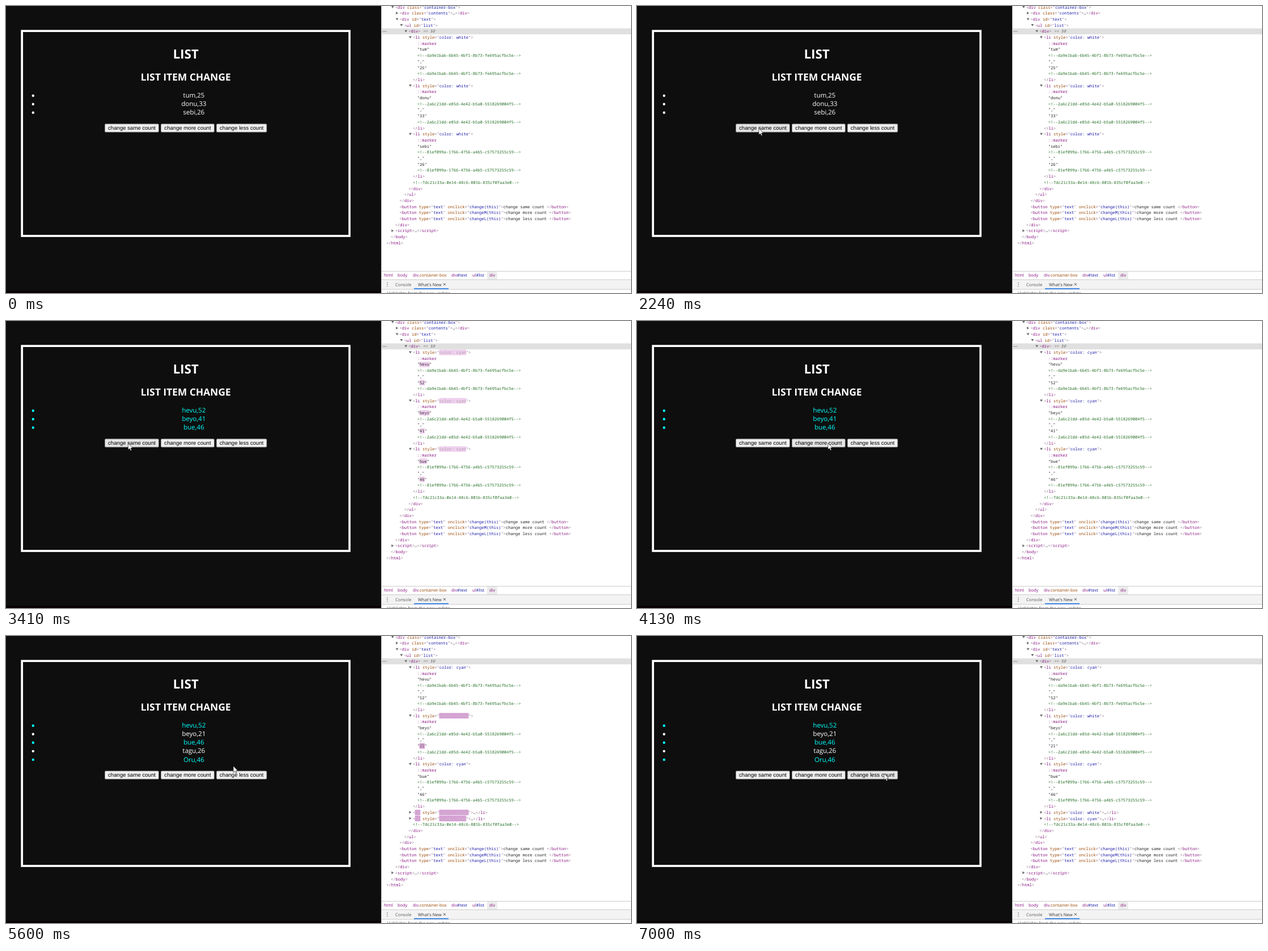
Animation of 1103x508 px, one loop 8 s. Source, as an HTML page:

```html
<!DOCTYPE html>
<html lang="en">
<head>
<meta charset="utf-8">
<style>
  html, body { margin: 0; width: 100%; height: 100%; overflow: hidden; background: #fff; }
  svg { display: block; }
  text { white-space: pre; text-rendering: geometricPrecision; }
  .page { font: 500 11.5px "Open Sans", "Noto Sans", sans-serif; text-anchor: middle; }
  .title { font: 700 22.3px "Open Sans", "Noto Sans", sans-serif; text-anchor: middle; fill: #fff; }
  .btn { font: 9.62px "Liberation Sans", Arial, sans-serif; text-anchor: middle; }
  .code { font: 500 7.1px "Noto Sans Mono", "DejaVu Sans Mono", monospace; }
  .ui { font: 7.4px "Open Sans", "Noto Sans", sans-serif; fill: #5a5a5a; }
  .bracket { fill: #8d6c8b; }
  .tag { fill: #881280; }
  .attr { fill: #994500; }
  .value { fill: #1a1aa6; }
  .comment { fill: #236e25; }
  .plain { fill: #222; }
  .ref { fill: #777; font-style: italic; }
</style>
</head>
<body>
<svg width="1103" height="508" viewBox="0 0 1103 508">
  <rect width="1103" height="508" fill="#fff"/>
  <rect width="662" height="508" fill="#0e0e0e"/>
  <rect y="504.5" width="662" height="3.5" fill="#080003"/>
  <rect x="662" width="1" height="508" fill="#c4c4c4"/>
  <rect x="28.2" y="44.2" width="578" height="362.8" fill="none" stroke="#fff" stroke-width="3.7"/>
  <text class="title" x="317.3" y="93">LIST</text>
  <text class="title" x="317.3" y="131.5" style="font-size:17.4px">LIST ITEM CHANGE</text>
  <g id="page"></g>
  <rect x="663" y="39.6" width="440" height="10.6" fill="#e0e0e0"/>
  <path d="M665 45h0m2.8 0h0m2.8 0h0" stroke="#555" stroke-width="1.4" stroke-linecap="round"/>
  <g id="tree" class="code"></g>
  <g class="ui">
    <path d="M663 469.5h440M663 484.5h440" stroke="#ccc"/>
    <rect x="849" y="470" width="18" height="14" fill="#ececec"/>
    <g class="tag">
      <text x="667" y="479.3">html</text>
      <text x="691" y="479.3">body</text>
      <text x="718" y="479.3">div<tspan class="attr">.container-box</tspan></text>
      <text x="786" y="479.3">div<tspan class="value">#text</tspan></text>
      <text x="823" y="479.3">ul<tspan class="value">#list</tspan></text>
      <text x="853" y="479.3">div</text>
    </g>
    <rect x="663" y="485" width="440" height="16" fill="#f3f3f3"/>
    <path d="M663 501.5h440" stroke="#ccc"/>
    <path d="M673 489.7h0m0 3.1h0m0 3.1h0" stroke="#555" stroke-width="1.5" stroke-linecap="round"/>
    <text x="687" y="495.6" style="font-size:7.6px">Console</text>
    <text x="727" y="495.6" style="font-size:7.6px" fill="#333">What's New</text>
    <path d="M771.8 490.6l4 4m0-4l-4 4" stroke="#333" stroke-width=".9"/>
    <rect x="720" y="499.6" width="61" height="1.6" fill="#1a73e8"/>
    <text x="672" y="511.3" style="font-size:7.6px">Highlights from the new update</text>
  </g>
  <path id="cursor" d="M0 0V11.5L2.6 9.2 4.4 13 6.2 12.2 4.5 8.4H8Z" fill="#fff" stroke="#000" stroke-width=".6"/>
</svg>
<script>
const LOOP = 8000, CHAR = 4.26, ROW = 10.7, FADE = 1400;
const $ = id => document.getElementById(id);

// Each list: when it appears, then [name, age, colour] per item
const lists = [
  { at: 0, items: [['tum', 25, 'white'], ['donu', 33, 'white'], ['sebi', 26, 'white']] },
  { at: 2664, items: [['hevu', 52, 'cyan'], ['beyo', 41, 'cyan'], ['bue', 46, 'cyan']] },
  { at: 5264, items: [['hevu', 52, 'cyan'], ['beyo', 21, 'white'], ['bue', 46, 'cyan'],
                      ['tagu', 26, 'white'], ['Oru', 46, 'cyan']] }
];
const ids = ['da9e1bab-6b45-4bf1-8b73-fe695acfbc5e',
             '2a6c21dd-e85d-4e42-b5a0-5518269004f5',
             '81ef099a-1766-4756-a4b5-c57573255c59'];
const buttons = [['same', 174.5, 95, ''], ['more', 273.5, 94, 'M'], ['less', 371.5, 88.5, 'L']];
const hovers = [[690, 3560], [3800, 5420], [6000, LOOP]];
const clicks = [2530, 5130];

const track = [
  [250, 505, 452], [410, 400, 330], [580, 255, 236], [740, 214, 216],
  [2239, 214, 216], [2240, 215, 216.5], [2530, 215.5, 216.5],
  [3450, 215.5, 216.5], [3700, 260, 222], [3950, 320, 219], [4130, 337, 216],
  [5400, 337, 216], [5600, 401, 230], [5760, 424, 236], [6000, 430, 240],
  [6400, 433, 247], [6710, 433, 249], [6860, 433, 249], [7000, 436, 243.5]
];

const mix = (a, b, p) => `rgb(${a.map((v, i) => Math.round(v + (b[i] - v) * p))})`;

// cubic-bezier(0, 0, .2, 1)
function ease(x) {
  let lo = 0, hi = 1;
  for (let i = 0; i < 20; i++) {
    const s = (lo + hi) / 2;
    if (.6 * s * s + .4 * s ** 3 < x) lo = s; else hi = s;
  }
  return 3 * lo * lo - 2 * lo ** 3;
}

// Colours of a changed part, or null once the highlight is over
function highlight(age) {
  const p = age / FADE;
  if (p >= 1) return null;
  const a = ease(Math.min(1, p / .8)), b = ease(Math.max(0, (p - .8) / .2));
  return {
    back: b ? mix([245, 219, 244], [255, 255, 255], b) : mix([158, 54, 153], [245, 219, 244], a),
    tag: mix([255, 255, 255], [168, 148, 166], a),
    text: mix([255, 255, 255], [34, 34, 34], a)
  };
}

// Rows are [depth, markup, arrow]; "~" marks a part that has just changed
function treeRows(step) {
  const { items } = lists[step], old = lists[Math.max(0, step - 1)].items;
  const rows = [[2, '<div class="container-box">', 'v'], [3, '<div class="contents">…</div>', '>'],
    [3, '<div id="text">', 'v'], [4, '<ul id="list">', 'v'], [5, '<div> == $0', 'v']];
  items.forEach((item, i) => {
    const was = old[i] || [];
    const [name, age, color] = item.map((v, k) => v === was[k] ? v : '~' + v);
    const style = `style="${color[0] === '~' ? '~' : ''}color: ${item[2]}"`;
    if (i > 2) return rows.push([6, `<~li ${style}>…</li>`, '>']);
    const note = [7, `<!--${ids[i]}-->`];
    rows.push([6, `<li ${style}>`, 'v'], [7, '::marker'], [7, `"${name}"`], note,
      [7, '","'], [7, `"${age}"`], note, [6, '</li>']);
  });
  rows.push([6, '<!--Tdc21c33a-0e14-48c6-801b-835cf0faa3e0-->'], [5, '</div>'], [4, '</ul>'], [3, '</div>']);
  for (const [word, , , letter] of buttons)
    rows.push([3, `<button type="text" onclick="change${letter}(this)">change ${word} count </button>`]);
  rows.push([2, '</div>'], [2, '<script>…<\/script>', '>'], [1, '</body>'], [0, '</html>']);
  return rows;
}

const pattern = /(<!--.*?-->)|(<\/?)(~?\w+)|(\w+)(=")(.*?)(")|(>)|(== \$0|::marker)|(\s|"|~?[^<>"~]+)/g;
const kinds = ['comment', 'bracket', 'tag', 'attr', 'bracket', 'value', 'bracket', 'bracket', 'ref', 'plain'];

function drawRow([depth, markup, arrow], index, glow) {
  const x = 671.2 + 7.8 * depth, y = 2 + ROW * index;
  let col = 0, back = '', spans = '';
  for (const match of markup.matchAll(pattern)) {
    match.slice(1).forEach((part, k) => {
      if (!part) return;
      const changed = part[0] === '~', word = changed ? part.slice(1) : part;
      const kind = word === '::marker' ? 'tag' : kinds[k];
      let style = '';
      if (changed && glow) {
        back += `<rect x="${x + col * CHAR - .5}" y="${y - 4.9}" width="${word.length * CHAR + 1}" height="9.8" rx="1" fill="${glow.back}"/>`;
        style = ` style="fill:${kind === 'plain' ? glow.text : glow.tag}"`;
      }
      spans += `<tspan class="${kind}"${style}>${word.replace(/</g, '&lt;')}</tspan>`;
      col += word.length;
    });
  }
  const mark = { v: `M${x - 7} ${y - 2}h5l-2.5 4z`, '>': `M${x - 6.5} ${y - 2.7}v5l4-2.5z` }[arrow];
  return back + (mark ? `<path d="${mark}" fill="#6e6e6e"/>` : '') +
    `<text x="${x}" y="${y + 2.5}">${spans}</text>`;
}

function drawPage(items, t) {
  const list = items.map(([name, age, color], i) => {
    const y = 158.3 + 15.05 * i;
    return `<g fill="${color}"><circle cx="47.8" cy="${y + .4}" r="2.2"/>` +
      `<text class="page" x="331.5" y="${y + 4}">${name},${age}</text></g>`;
  });
  const top = 208.8 + 15.05 * (items.length - 3);
  const row = buttons.map(([word, x, w], i) => {
    const over = t >= hovers[i][0] && t < hovers[i][1];
    const down = t >= clicks[i] && t < clicks[i] + 130;
    return `<rect x="${x}" y="${top}" width="${w}" height="14.4" rx="1.5" fill="${down ? '#f5f5f5' : over ? '#e5e5e5' : '#efefef'}" stroke="#767676" stroke-width=".8"/>` +
      `<text class="btn" x="${x + w / 2}" y="${top + 10.5}">change ${word} count</text>`;
  });
  return list.concat(row).join('');
}

function cursorAt(t) {
  const i = track.findIndex(k => k[0] > t);
  if (i < 0) return track[track.length - 1].slice(1);
  const [t0, x0, y0] = track[i - 1], [t1, x1, y1] = track[i];
  const p = (t - t0) / (t1 - t0);
  return [x0 + (x1 - x0) * p, y0 + (y1 - y0) * p];
}

const start = performance.now();
function frame() {
  const t = (performance.now() - start) % LOOP;
  const step = lists.filter(l => l.at <= t).length - 1, { at, items } = lists[step];
  const glow = step ? highlight(t - at) : null;
  $('page').innerHTML = drawPage(items, t);
  $('tree').innerHTML = treeRows(step).map((row, i) => drawRow(row, i, glow)).join('');
  const shown = t >= track[0][0];
  $('cursor').setAttribute('visibility', shown ? 'visible' : 'hidden');
  if (shown) $('cursor').setAttribute('transform', `translate(${cursorAt(t)})`);
  requestAnimationFrame(frame);
}
frame();
</script>
</body>
</html>
```
